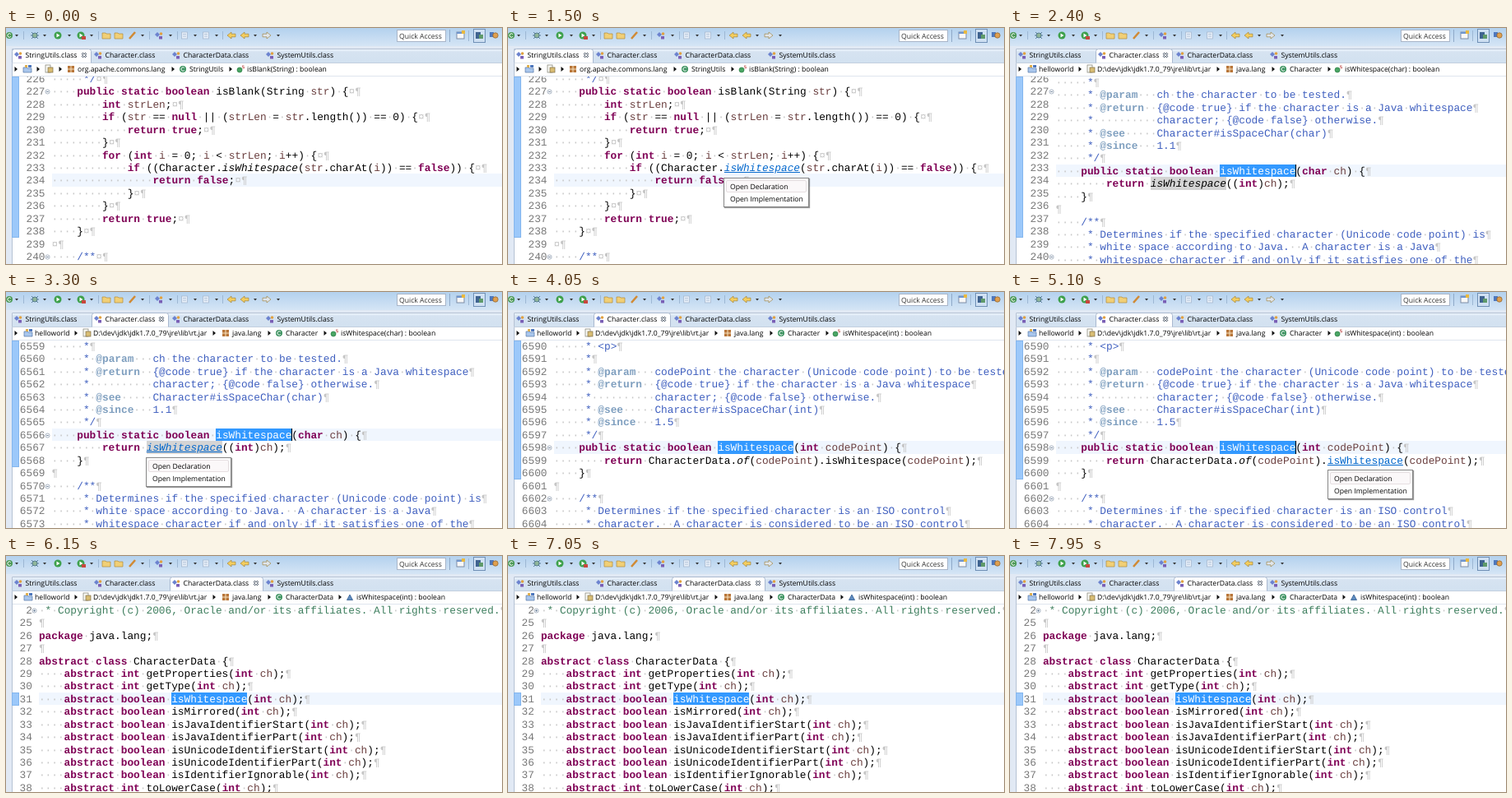
Write an HTML page that moves like this. It is 603 px wide and 287 px high and loops after 8000 ms.

```html
<!DOCTYPE html>
<html lang="en">
<head>
<meta charset="utf-8">
<title>Jumping through declarations</title>
<style>
html, body { margin: 0; width: 100%; height: 100%; overflow: hidden; background: #fff; }
#stage { position: relative; width: 603px; height: 287px; overflow: hidden; background: #fff; text-rendering: geometricPrecision; }
#chrome { position: absolute; left: 0; top: 0; }
#chrome text, .popup { font-family: "Open Sans", "Noto Sans", sans-serif; font-size: 8.65px; }
#code { position: absolute; left: 0; top: 59px; width: 603px; height: 228px; overflow: hidden;
  font: 12.8px/18.45px "Liberation Mono", "DejaVu Sans Mono", monospace; }

.layer { opacity: 0; animation: 8s step-end infinite; }
.text, .gutter, .range { position: absolute; white-space: pre; }
.text { width: 603px; }
.row { height: 15.45px; }
.current { background: #f0f6fe; }
.gutter { left: 0; text-align: right; color: #787878; }
.gutter .row { position: relative; }
.fold { position: absolute; right: -6px; top: 5px; width: 5px; height: 5px; border: 1px solid #98a4b6; border-radius: 50%; transform: scale(.85); }
.fold::before, .plus::after { content: ""; position: absolute; left: 1px; top: 2px; width: 3px; height: 1px; background: #5f7590; }
.plus::after { transform: rotate(90deg); }
.range { left: 7px; width: 7px; background: #9cc8fa; border: 1px solid #84b6ee; }

.key { color: #7f0055; font-weight: bold; }
.var { color: #6a3e3e; }
.doc { color: #3f5fbf; }
.note { color: #3f7f5f; }
.tag { color: #7f9fbf; font-weight: bold; }
.ws { color: #c6c6c6; font-weight: normal; }
.sel, .link { display: inline-block; height: 15.45px; vertical-align: top; }
.sel { background: #3399ff; color: #fff; }
.textB .sel { box-shadow: 1px 0 #000; }
.link { animation: 8s step-end infinite; }
.textA .link, .textB .link { font-style: italic; }
.textB .link { background: #d4d4d4; }

.popup { position: absolute; box-sizing: border-box; width: 104px; height: 36px; padding: 2px; border: 1px solid #858585; background: #fff;
  line-height: 14px; box-shadow: 1px 1px 1px #0006; white-space: pre; color: #000; }
.popup div { box-sizing: border-box; height: 15px; padding-left: 4px; border: 1px solid transparent; }
.popup div:first-child { border-color: #e6dfe1; background: #fbf8f9; border-radius: 2px; }

.textA { animation-name: textA; } .gutterA { animation-name: gutterA; } .headA { animation-name: headA; }
.textB { animation-name: textB; } .gutterB { animation-name: gutterB; } .headB { animation-name: headB; }
.textC, .gutterC, .headC { animation-name: sceneC; }
.textD, .gutterD, .headD { animation-name: sceneD; }
.popA { animation-name: popA; } .popB { animation-name: popB; } .popC { animation-name: popC; }
.textA .link { animation-name: linkA; } .textB .link { animation-name: linkB; } .textC .link { animation-name: linkC; }
.textC .sel { animation: caretC 8s step-end infinite; }

@keyframes textA { 0% { opacity: 1 } 30% { opacity: 0 } }
@keyframes gutterA { 0% { opacity: 1 } 31.875% { opacity: 0 } }
@keyframes headA { 0% { opacity: 1 } 28.125% { opacity: 0 } }
@keyframes textB { 30% { opacity: 1 } 50.625% { opacity: 0 } }
@keyframes gutterB { 31.875% { opacity: 1 } 50.625% { opacity: 0 } }
@keyframes headB { 28.125% { opacity: 1 } 50.625% { opacity: 0 } }
@keyframes sceneC { 50.625% { opacity: 1 } 69.375% { opacity: 0 } }
@keyframes sceneD { 69.375%, 100% { opacity: 1 } }
@keyframes popA { 18.75% { opacity: 1 } 26.25% { opacity: 0 } }
@keyframes popB { 41.25% { opacity: 1 } 46.875% { opacity: 0 } }
@keyframes popC { 63.75% { opacity: 1 } 67.5% { opacity: 0 } }
@keyframes linkA { 16.875% { color: #06c; text-decoration: underline } 26.25% { color: #000; text-decoration: none } }
@keyframes linkB { 35.625% { color: #06c; text-decoration: underline } 46.875% { color: #000; text-decoration: none } }
@keyframes linkC { 60% { color: #06c; text-decoration: underline } 67.5% { color: #000; text-decoration: none } }
@keyframes caretC { 63.75% { box-shadow: 1px 0 #000 } 67.5% { box-shadow: none } }
</style>
</head>
<body>
<div id="stage">
  <svg id="chrome" width="603" height="287"></svg>
  <div id="code"></div>
</div>
<script>
const ROW = 15.45, TOP = 59;

const scenes = {
  A: {
    x: 55.5, y: 61.6, first: 226, folds: [1, 14], current: 8, range: [59, 255], eol: '¤¶', tab: 0,
    crumbs: [['project', 26], ['jar', 52], ['pack', 79, 'org.apache.commons.lang'],
      ['type', 215, 'StringUtils'], ['method', 285, 'isBlank(String) : boolean']],
    arrows: [12, 39, 66, 203, 273],
    code: `     */
    public static boolean isBlank(String str) {
        int strLen;
        if (str == null || (strLen = str.length()) == 0) {
            return true;
        }
        for (int i = 0; i < strLen; i++) {
            if ((Character.|isWhitespace|(str.charAt(i)) == false)) {
                return false;
            }
        }
        return true;
    }

    /**`
  },
  B: {
    x: 55.5, y: 65.5, first: 6559, folds: [7, 11], current: 7, range: [59, 213], eol: '¶', tab: 1,
    crumbs: [['project', 27, 'helloworld'], ['jar', 98, 'D:\\dev\\jdk\\jdk1.7.0_79\\jre\\lib\\rt.jar'],
      ['pack', 267, 'java.lang'], ['type', 332, 'Character'], ['method', 399, 'isWhitespace(char) : boolean']],
    arrows: [12, 85, 253, 320, 388],
    code: `     *
     * @param   ch the character to be tested.
     * @return  {@code true} if the character is a Java whitespace
     *          character; {@code false} otherwise.
     * @see     Character#isSpaceChar(char)
     * @since   1.1
     */
    public static boolean [isWhitespace](char ch) {
        return |isWhitespace|((int)ch);
    }

    /**
     * Determines if the specified character (Unicode code point) is
     * white space according to Java.  A character is a Java
     * whitespace character if and only if it satisfies one of the`
  },
  C: {
    x: 55.5, y: 65.5, first: 6590, folds: [8, 12], current: 8, range: [59, 228], eol: '¶', tab: 1,
    code: `     * <p>
     *
     * @param   codePoint the character (Unicode code point) to be tested.
     * @return  {@code true} if the character is a Java whitespace
     *          character; {@code false} otherwise.
     * @see     Character#isSpaceChar(int)
     * @since   1.5
     */
    public static boolean [isWhitespace](int codePoint) {
        return CharacterData.~of~(codePoint).|isWhitespace|(codePoint);
    }

    /**
     * Determines if the specified character is an ISO control
     * character.  A character is considered to be an ISO control`
  },
  D: {
    x: 39.9, y: 65.5, first: 24, folds: [0], current: 7, range: [166, 182], eol: '¶', tab: 2, header: true,
    arrows: [12, 85, 253, 320, 406],
    code: ` * Copyright (c) 2006, Oracle and/or its affiliates. All rights reserved.

package java.lang;

abstract class CharacterData {
    abstract int getProperties(int ch);
    abstract int getType(int ch);
    abstract boolean [isWhitespace](int ch);
    abstract boolean isMirrored(int ch);
    abstract boolean isJavaIdentifierStart(int ch);
    abstract boolean isJavaIdentifierPart(int ch);
    abstract boolean isUnicodeIdentifierStart(int ch);
    abstract boolean isUnicodeIdentifierPart(int ch);
    abstract boolean isIdentifierIgnorable(int ch);
    abstract int toLowerCase(int ch);`
  }
};
const crumbs = scenes.B.crumbs;
scenes.C.crumbs = [...crumbs.slice(0, 4), ['method', 399, 'isWhitespace(int) : boolean']];
scenes.C.arrows = scenes.B.arrows;
scenes.D.crumbs = [...crumbs.slice(0, 3), ['type', 332, 'CharacterData'], ['abstract', 418, 'isWhitespace(int) : boolean']];

// ---- editor text
const keys = /^(public|static|boolean|int|char|if|null|return|true|false|for|package|abstract|class)$/;
const vars = /^(str|strLen|i|ch|codePoint)$/;
const span = (cls, s) => `<span class="${cls}">${s}</span>`;
const dots = s => span('ws', '·'.repeat(s.length));

function paint(line, header) {
  const s = line.replace(/</g, '&lt;');
  if (/^ *(\/\*|\*)/.test(line)) {
    return span(header ? 'note' : 'doc', s.replace(/@(param|return|see|since)\b| +/g,
      (m, tag) => tag ? span('tag', m) : dots(m)));
  }
  return s.replace(/\|(\w+)\||\[(\w+)\]|~(\w+)~|\w+| +/g, (m, link, sel, italic) =>
    link ? span('link', link) : sel ? span('sel', sel) : italic ? `<i>${italic}</i>` :
    m[0] === ' ' ? dots(m) : keys.test(m) ? span('key', m) : vars.test(m) ? span('var', m) : m);
}

function editor(id, s) {
  const top = s.y - ROW / 2 - TOP;
  const lines = s.code.split('\n');
  const rows = lines.map((line, k) =>
    `<div class="row${k === s.current ? ' current' : ''}">${paint(line, s.header)}${span('ws', s.eol)}</div>`);
  const nums = lines.map((_, k) => {
    const fold = s.folds.includes(k) ? `<b class="fold${s.header ? ' plus' : ''}"></b>` : '';
    return `<div class="row">${s.header && !k ? 2 : s.first + k}${fold}</div>`;
  });
  const [y1, y2] = s.range;
  return `<div class="layer gutter${id}"><div class="range" style="top:${y1 - TOP}px;height:${y2 - y1 - 2}px"></div>
    <div class="gutter" style="top:${top}px;width:${s.x - 8}px">${nums.join('')}</div></div>
    <div class="layer text text${id}" style="left:${s.x}px;top:${top}px">${rows.join('')}</div>`;
}

const popup = (id, x, y) => `<div class="layer popup pop${id}" style="left:${x}px;top:${y - TOP}px">` +
  '<div>Open Declaration</div><div>Open Implementation</div></div>';

document.getElementById('code').innerHTML =
  Object.entries(scenes).map(([id, s]) => editor(id, s)).join('') +
  popup('A', 262, 182) + popup('B', 170, 201) + popup('C', 386, 216);

// ---- toolbar, tabs and breadcrumb
const rect = (x, y, w, h, fill, more = '') => `<rect x="${x}" y="${y}" width="${w}" height="${h}" fill="${fill}" ${more}/>`;
const dot = (x, y, r, fill, more = '') => `<circle cx="${x}" cy="${y}" r="${r}" fill="${fill}" ${more}/>`;
const path = (d, fill, more = '') => `<path d="${d}" fill="${fill}" ${more}/>`;
const label = (x, y, s, fill = '#000') => `<text x="${x}" y="${y}" fill="${fill}">${s}</text>`;
const line = (d, stroke, w = 1) => path(d, 'none', `stroke="${stroke}" stroke-width="${w}"`);

const icon = {
  project: x => path(`M${x - 5} 48h4l1 1h5v5h-10z`, '#a9c6ec', 'stroke="#5377a8" stroke-width=".7"') + rect(x - 3, 45, 3, 3, '#e0b050') + rect(x + 1, 45, 4, 3, '#4f78bd'),
  jar: x => rect(x - 4, 45, 6, 9, '#fbfbf6', 'stroke="#8c8c80" stroke-width=".8"') + rect(x - 1, 48, 6, 6, '#d9bd74', 'stroke="#7d6c42" stroke-width=".7"'),
  pack: x => rect(x - 4, 46, 8, 8, '#b8763a') + line(`M${x - 4} 50h8M${x} 46v8`, '#f7e3c0'),
  type: x => dot(x, 50, 4, '#3f9462') + line(`M${x + 1.8} 48.6a2.2 2.2 0 1 0 0 2.8`, '#fff'),
  method: x => dot(x - 1, 51, 3, '#4aa564', 'stroke="#267a40" stroke-width=".7"') + line(`M${x + 4.5} 45.8h-2v1.6h2v1.6h-2.2`, '#c0504d', .7),
  abstract: x => path(`M${x} 47l3.5 6.5h-7z`, '#5f8cc0', 'stroke="#2f5a8f" stroke-width=".8"')
};
const gems = (x, y) => path(`M${x - 2} ${y - 4}l3 3-3 3-3-3z`, '#6d83cf') +
  dot(x + 2.5, y - 2, 1.8, '#e0a040') + rect(x, y + 1, 4, 3.5, '#7a5fb5');

const tabs = [[7, 104, 'StringUtils.class'], [104, 198, 'Character.class'], [199, 313, 'CharacterData.class'], [313, 0, 'SystemUtils.class']];

function head(id, s) {
  const [l, r] = tabs[s.tab], x = r - 9;
  const cross = `M${x - 2.5} 30.5l5 5m0-5l-5 5`;
  return `<g class="layer head${id}">` +
    path(`M${l + .5} 42.5V28.5q0-3 3-3H${r - 3.5}q3 0 3 3V42.5`, '#fff', 'stroke="#a9b8cf"') +
    line(cross, '#6d7683', 2.6) + line(cross, '#fff') +
    s.arrows.map(a => path(`M${a - 1.5} 47l3.5 3-3.5 3z`, '#111')).join('') +
    s.crumbs.map(([kind, cx, text]) => icon[kind](cx) + (text ? label(cx + 8, 53, text) : '')).join('') + '</g>';
}

const chevrons = [13, 47, 77, 104, 166, 200, 230, 256, 303, 331];
const arrow = (x, dir, fill) => path(`M${x} 9l${5 * dir}-4v2.2h${5 * dir}v3.6h${-5 * dir}v2.2z`, fill, 'stroke="#9b7a2c" stroke-width=".6"');
const folder = x => path(`M${x - 5} 6h4l1 1h5v6h-10z`, '#f1cf76', 'stroke="#b08a3a" stroke-width=".7"');
const run = x => dot(x, 9, 4.5, '#3da04b') + path(`M${x - 1.5} 6.5l4 2.5-4 2.5z`, '#fff');
const bug = x => line(`M${x - 4} 5l8 8m0-8l-8 8M${x - 5} 9h10`, '#3d6580', .8) + dot(x, 9, 3, '#8fb59a', 'stroke="#3d6580" stroke-width=".7"');
const page = x => rect(x - 3.5, 5, 7, 8, '#e6eef8', 'stroke="#a7b9d0" stroke-width=".8"') + line(`M${x - 2} 7.5h4M${x - 2} 10h4`, '#b3c3d8');

document.getElementById('chrome').innerHTML = `<defs>
  <linearGradient id="bar" x2="0" y2="1"><stop stop-color="#b3d1ee"/><stop offset="1" stop-color="#d5e5f5"/></linearGradient>
  <linearGradient id="tabs" x2="0" y2="1"><stop stop-color="#f3f9ff"/><stop offset=".25" stop-color="#d6e3f1"/><stop offset="1" stop-color="#d2e1f0"/></linearGradient>
  </defs>` +
  rect(0, 0, 603, 22, 'url(#bar)') + rect(0, 22, 603, 3, '#e1e9f4') + rect(0, 25, 7, 262, '#e1e9f4') +
  rect(7, 25, 596, 17, 'url(#tabs)') + line('M603 25.5H7.5V287', '#b6c2d4') + line('M7 42.5H603', '#c3cfdf') +
  line('M8 58.5H603', '#dfe5ee') +
  dot(4, 9, 4, '#4c9a57') + line('M5.8 7.6a2.2 2.2 0 1 0 0 2.8', '#fff') +
  bug(35) + run(63) + run(91) + rect(92, 10, 5, 4, '#c9473d') +
  folder(122) + folder(137) + line('M150 13l7-8', '#d08a35', 2.5) + gems(186, 9) +
  page(217) + page(243) + arrow(269, 1, '#f4cd5e') + arrow(285, 1, '#f4cd5e') + arrow(322, -1, '#dfe5ec') +
  chevrons.map(x => path(`M${x - 2} 8h4l-2 2.5z`, '#333')).join('') +
  [21, 112, 174, 208, 263].map(x => line(`M${x}.5 4v10`, '#9db7d3')).join('') +
  rect(475.5, 2.5, 59, 14, '#fff', 'stroke="#a8b5c8"') + label(478, 12.7, 'Quick Access', '#333') +
  line('M539.5 2v15', '#8fa9c8') + rect(548, 5, 9, 8, '#f8f8f8', 'stroke="#7d8ca5"') + rect(548, 5, 9, 2, '#6f95cf') + rect(554, 3, 4, 4, '#e9b93f') +
  line('M562.5 3v13', '#9db7d3') + rect(568.5, 1.5, 14, 16, '#cfe0f3', 'stroke="#6f8fb5"') +
  rect(571, 5, 6, 8, '#3f6390') + rect(575, 8, 5, 5, '#5f9a6a') +
  rect(588, 5, 5, 6, '#4f78bd') + dot(595, 9, 3.2, '#e0a050', 'stroke="#8a5f2c" stroke-width=".7"') +
  Object.entries(scenes).map(([id, s]) => head(id, s)).join('') +
  tabs.map(([l, , name]) => gems(l + 8, 33) + label(l + 16.5, 36.2, name)).join('');
</script>
</body>
</html>
```
